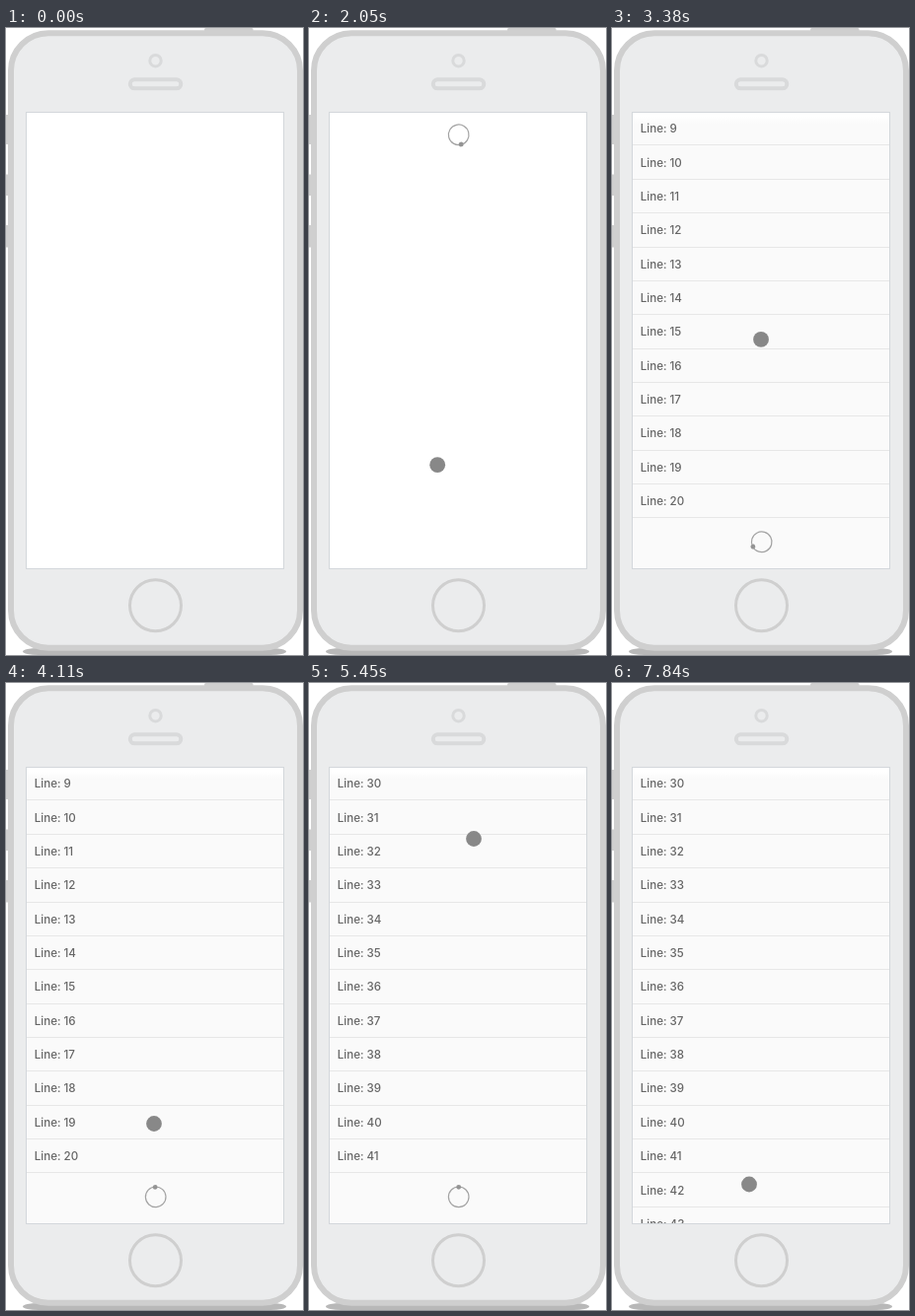
Write an HTML page that moves like this. It is 301 px wide and 636 px high and loops after 7.99 s.

```html
<!DOCTYPE html>
<html lang="en">
<head>
<meta charset="utf-8">
<title>Infinite list</title>
<style>
  html, body { margin: 0; width: 100%; height: 100%; overflow: hidden; background: #fff; }
  svg { display: block; width: 100%; height: 100%; }
  text { font: 500 11.6px Inter, sans-serif; fill: #666; }
  .body { fill: #ebeced; stroke: #cfcfcf; stroke-width: 6; }
  .edge { fill: #cfcfcf; }
  .detail { fill: none; stroke: #d9dadb; }
  .line { fill: #e7e7e7; shape-rendering: crispEdges; }
</style>
</head>
<body>
<svg viewBox="0 0 301 636">
  <defs>
    <clipPath id="view"><rect x="21" y="90" width="260" height="458"/></clipPath>
    <linearGradient id="fade" x2="0" y2="1">
      <stop stop-color="#fff"/><stop offset=".015" stop-color="#fafafa"/>
    </linearGradient>
  </defs>
  <rect x="17" y="629" width="267" height="7" rx="16" ry="3.5" fill="#b8b8b8"/>
  <g class="edge">
    <rect x="201" y="0" width="49.5" height="5" rx="1.5"/>
    <rect x="0" y="88" width="5" height="30"/>
    <rect x="0" y="148.5" width="5" height="21.5"/>
    <rect x="0" y="200" width="5" height="22.5"/>
  </g>
  <rect class="body" x="5" y="5.3" width="293" height="623.5" rx="38"/>
  <circle class="detail" cx="151.5" cy="33.2" r="5.7" stroke-width="3"/>
  <rect class="detail" x="125.8" y="52.3" width="51.5" height="9" rx="4.5" stroke-width="4"/>
  <circle class="detail" cx="151.5" cy="585.7" r="26" stroke-width="3" style="stroke:#cfcfcf"/>
  <rect x="20.5" y="85.5" width="261" height="463" fill="#fff" stroke="#d3d7db"/>
  <g clip-path="url(#view)">
    <rect id="paper" x="21" y="90" width="260" height="458" fill="url(#fade)"/>
    <g id="list"></g>
    <g id="spinner">
      <circle r="10.3" fill="none" stroke="#a3a3a3" stroke-width="1.2"/>
      <circle cy="-10" r="2.4" fill="#949494"/>
    </g>
  </g>
  <circle id="pointer" r="7.9" fill="#888"/>
</svg>
<script>
// Times below are counted in steps; the picture holds still within a step.
const LOOP = 7990, STEP = 147.7, LAST = 53;
const ROW = 34.36, TOP = 96, BATCH = 21, VIEW = 401;
const CYCLE = 18, LOADING = 14, TURN = 10.2;
const DRAGS = [17, 33], DRAG = 4;

const [paper, list, spinner, pointer] =
  ['paper', 'list', 'spinner', 'pointer'].map(id => document.getElementById(id));

const push = k => k ** 2.35;
const glide = k => 1 - (1 - k) ** 2;
const clamp = k => Math.max(0, Math.min(1, k));

// Where the pointer turns, and how it gets there: [step, x, y, easing].
const stops = [
  [6, 56, 310], [9, 113, 389, glide], [DRAGS[0], 133, 452, glide],
  [DRAGS[0] + DRAG, 152, 190, push], [28, 150, 447, glide], [DRAGS[1], 146, 450, glide],
  [DRAGS[1] + DRAG, 167, 158, push], [39, 167, 158, glide],
  [46, 152, 455.5, glide], [LAST, 139, 508.5, push]
];

function pointerAt(n) {
  const i = Math.max(1, stops.findIndex(stop => stop[0] >= n));
  const [t0, x0, y0] = stops[i - 1], [t1, x1, y1, easing] = stops[i];
  const k = easing(clamp((n - t0) / (t1 - t0)));
  return [x0 + (x1 - x0) * k, y0 + (y1 - y0) * k];
}

// Each drag takes the list to the end of the rows loaded so far.
function scrollAt(n) {
  return DRAGS.reduce((scroll, from, i) => {
    const end = (i + 1) * BATCH * ROW - VIEW;
    return scroll + (end - scroll) * push(clamp((n - from) / DRAG));
  }, 0);
}

// The CSS "ease" curve.
function ease(x) {
  const bezier = (u, p, q) => 3 * u * (1 - u) ** 2 * p + 3 * u * u * (1 - u) * q + u ** 3;
  let lo = 0, hi = 1;
  for (let i = 0; i < 24; i++) {
    const mid = (lo + hi) / 2;
    if (bezier(mid, .25, .25) < x) lo = mid; else hi = mid;
  }
  return bezier(lo, .1, 1);
}

function add(parent, tag, attrs, text = '') {
  const node = document.createElementNS(parent.namespaceURI, tag);
  for (const key in attrs) node.setAttribute(key, attrs[key]);
  node.textContent = text;
  return parent.appendChild(node);
}

const rows = Array.from({ length: 3 * BATCH }, (_, i) => {
  const row = add(list, 'g', { transform: `translate(0 ${i * ROW})` });
  add(row, 'text', { x: 28.7, y: 21.5 }, `Line: ${i}`);
  add(row, 'rect', { class: 'line', x: 21, y: ROW - .6, width: 260, height: 1 });
  return row;
});

const show = (node, on) => { node.style.display = on ? '' : 'none'; };

function draw(now) {
  const n = Math.min(LAST, Math.floor((now % LOOP + 25) / STEP));
  const scroll = scrollAt(n);
  const count = BATCH * Math.floor((n - 1 + CYCLE - LOADING) / CYCLE);
  show(paper, count > 0);
  rows.forEach((row, i) => show(row, i < count));
  list.setAttribute('transform', `translate(0 ${TOP - scroll})`);

  const waited = (n - 1) % CYCLE;
  const y = TOP + count * ROW - scroll + (count ? 24.3 : 12.3);
  show(spinner, n > 0 && waited < LOADING);
  spinner.setAttribute('transform', `translate(151.7 ${y}) rotate(${360 * ease(Math.max(0, waited) / TURN % 1)})`);

  show(pointer, n >= stops[0][0]);
  pointer.setAttribute('transform', `translate(${pointerAt(n)})`);
}

const start = performance.now();
function tick() {
  draw(performance.now() - start);
  requestAnimationFrame(tick);
}
tick();
</script>
</body>
</html>
```
